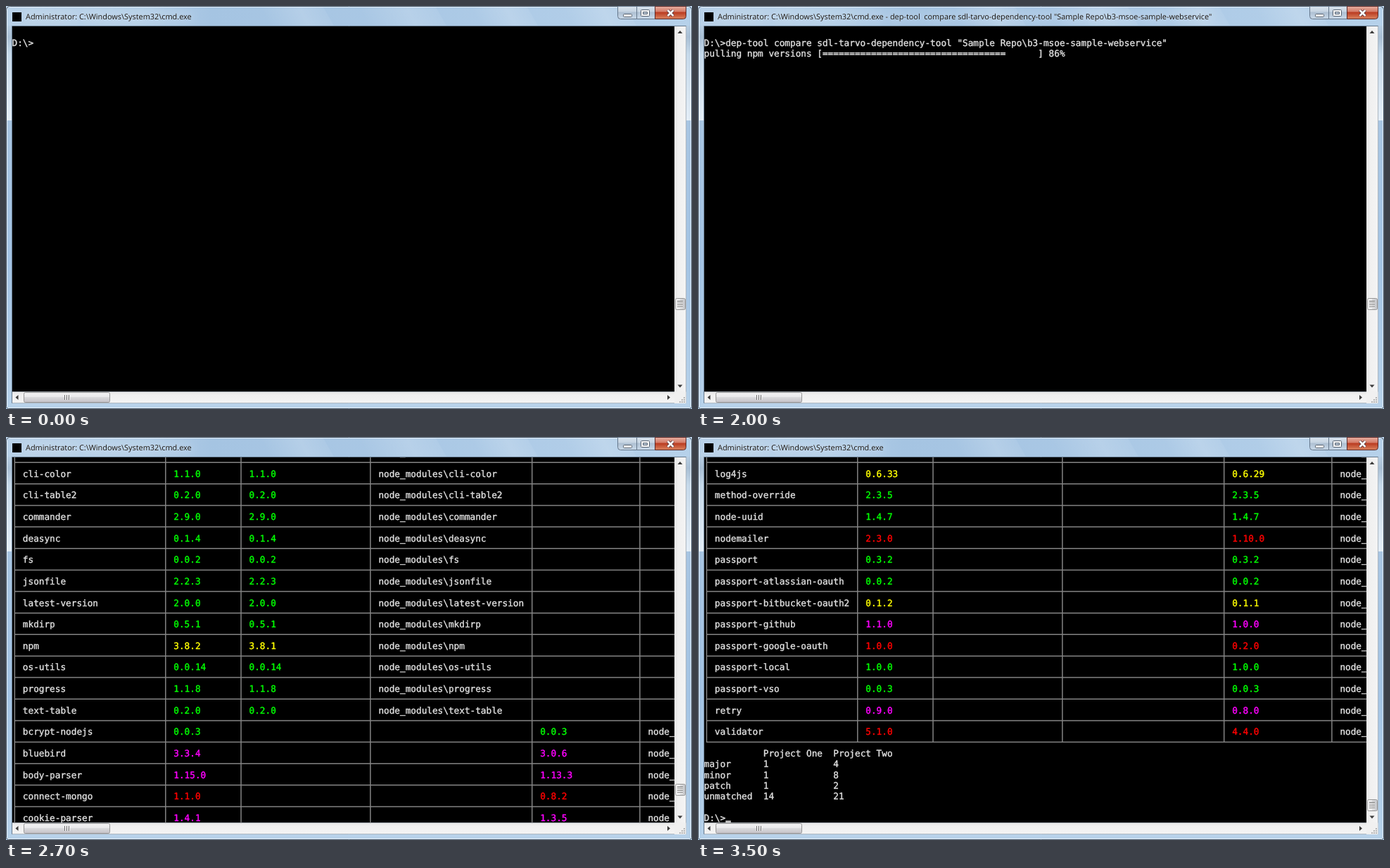
An HTML page with a canvas that plays this animation: 975 by 574 pixels, repeating every 6500 ms.

```html
<!DOCTYPE html>
<html lang="en">
<head>
<meta charset="utf-8">
<title>Console</title>
<style>
html, body { margin: 0; width: 100%; height: 100%; overflow: hidden; background: #b4cfe8; }
canvas { display: block; width: 975px; height: 574px; }
</style>
</head>
<body>
<canvas id="stage" width="975" height="574"></canvas>
<script>
const ctx = document.getElementById('stage').getContext('2d');
const W = 975, H = 574, LOOP = 6500;
const CELL = 7.66, LINE = 15.32, LEFT = 8.5, TOP = 29;
const MONO = '12.72px "DejaVu Sans Mono", monospace';
const SANS = '10.92px "Open Sans", sans-serif';
const TEXT = '#dedede';
const COLORS = { g: '#00ff00', m: '#ff00ff', r: '#ff0000', y: '#ffff00' };

const ARGS = 'compare sdl-tarvo-dependency-tool "Sample Repo\\b3-msoe-sample-webservice"';
const PROMPT = 'D:\\>';
const COMMAND = PROMPT + 'dep-tool ' + ARGS;
const TITLE = 'Administrator: C:\\Windows\\System32\\cmd.exe';

const RULES = [0, 28, 42, 66, 96, 116];
const HEADS = ['Module Name', 'NPM Version', 'dependency-comparator',
  'dependency-comparator Path', 'sample-webservice', 'sample-webservice Path'];
// module, colour, npm version, first project, second project
const MODULES = `jenkins m 0.15.0 0.13.0 0.10.1
async r 2.0.0-rc.1 1.5.2
chalk g 1.1.1 1.1.1
cli-color g 1.1.0 1.1.0
cli-table2 g 0.2.0 0.2.0
commander g 2.9.0 2.9.0
deasync g 0.1.4 0.1.4
fs g 0.0.2 0.0.2
jsonfile g 2.2.3 2.2.3
latest-version g 2.0.0 2.0.0
mkdirp g 0.5.1 0.5.1
npm y 3.8.2 3.8.1
os-utils g 0.0.14 0.0.14
progress g 1.1.8 1.1.8
text-table g 0.2.0 0.2.0
bcrypt-nodejs g 0.0.3 - 0.0.3
bluebird m 3.3.4 - 3.0.6
body-parser m 1.15.0 - 1.13.3
connect-mongo r 1.1.0 - 0.8.2
cookie-parser m 1.4.1 - 1.3.5
ejs m 2.4.1 - 2.3.4
express g 4.13.4 - 5.0.0-alpha.2
express-session m 1.13.0 - 1.11.3
log4js y 0.6.33 - 0.6.29
method-override g 2.3.5 - 2.3.5
node-uuid g 1.4.7 - 1.4.7
nodemailer r 2.3.0 - 1.10.0
passport g 0.3.2 - 0.3.2
passport-atlassian-oauth g 0.0.2 - 0.0.2
passport-bitbucket-oauth2 y 0.1.2 - 0.1.1
passport-github m 1.1.0 - 1.0.0
passport-google-oauth r 1.0.0 - 0.2.0
passport-local g 1.0.0 - 1.0.0
passport-vso g 0.0.3 - 0.0.3
retry m 0.9.0 - 0.8.0
validator r 5.1.0 - 4.4.0`.split('\n').map(row => row.split(' '));
const TABLE_TOP = 2, TABLE_END = TABLE_TOP + 2 + MODULES.length * 2;
const SUMMARY = [['', 'Project One', 'Project Two'], ['major', '1', '4'],
  ['minor', '1', '8'], ['patch', '1', '2'], ['unmatched', '14', '21']];

const cellX = col => LEFT + col * CELL;
const lineY = row => TOP + row * LINE;

function rect(x, y, w, h, fill) {
  ctx.fillStyle = fill;
  ctx.fillRect(x, y, w, h);
}

function gradient(x0, y0, x1, y1, ...stops) {
  const g = ctx.createLinearGradient(x0, y0, x1, y1);
  stops.forEach(([at, color]) => g.addColorStop(at, color));
  return g;
}

function poly(fill, ...pts) {
  ctx.fillStyle = fill;
  ctx.beginPath();
  pts.forEach(([x, y]) => ctx.lineTo(x, y));
  ctx.fill();
}

function box(x, y, w, h, radius, fill, stroke) {
  ctx.beginPath();
  ctx.roundRect(x + .5, y + .5, w - 1, h - 1, radius);
  ctx.fillStyle = fill;
  ctx.fill();
  ctx.strokeStyle = stroke;
  ctx.lineWidth = 1;
  ctx.stroke();
}

// The thin outline gives the letters the weight of a console font.
function print(row, col, text, color = TEXT) {
  const x = cellX(col), y = Math.round(lineY(row) + 12.4);
  ctx.fillStyle = ctx.strokeStyle = color;
  ctx.lineWidth = .4;
  ctx.fillText(text, x, y);
  ctx.strokeText(text, x, y);
}

function cursor(row, col) {
  rect(cellX(col), lineY(row) + 11.8, CELL, 3.6, '#c4c4c4');
}

function drawFrame() {
  rect(0, 0, W, H, gradient(0, 0, W, 0, [0, '#b9d1e8'], [.2, '#b4cfe8'], [.3, '#a5c4e2'], [.6, '#aac8e5'], [1, '#b6d1ea']));
  for (const [x, w] of [[360, 90], [500, 110], [660, 80], [790, 90]]) {
    const shine = gradient(x, 0, x + w, -w / 2, [0, 'rgba(255,255,255,0)'], [.5, 'rgba(255,255,255,.16)'], [1, 'rgba(255,255,255,0)']);
    poly(shine, [x, 0], [x + w, 0], [x + w + 16, 28], [x + 16, 28]);
  }
  for (const x of [0, 967]) {
    rect(x, 28, 8, 135, gradient(0, 28, 0, 163, [0, '#b7cde2'], [.12, '#a9bfd4'], [.3, '#c6d9ea'], [1, '#e4eef7']));
    rect(x, 163, 8, 411, gradient(0, 163, 0, 574, [0, '#a8c5e2'], [.5, '#a4c4e4'], [1, '#b7d2ea']));
  }
  rect(8, 566, 959, 8, '#b8d2ea');
  ctx.lineWidth = 1;
  ctx.strokeStyle = 'rgba(255,255,255,.7)';
  ctx.strokeRect(1.5, 1.5, W - 3, H - 3);
  ctx.strokeStyle = '#3b4d60';
  ctx.beginPath();
  ctx.roundRect(.5, .5, W - 1, H - 1, [5, 5, 3, 3]);
  ctx.stroke();
  ctx.strokeStyle = '#65798d';
  ctx.strokeRect(8.5, 28.5, 958, 537);
}

function drawButtons() {
  const glass = gradient(0, 0, 0, 18, [0, '#dbe5ef'], [.45, '#c6d4e2'], [.5, '#adbfd2'], [1, '#c8d8e8']);
  const red = gradient(0, 0, 0, 18, [0, '#e8b3a6'], [.45, '#d47a66'], [.5, '#b93a20'], [1, '#d9805c']);
  box(869, 0, 28, 19, [0, 0, 0, 4], glass, '#65778b');
  box(896, 0, 27, 19, 0, glass, '#65778b');
  box(922, 0, 45, 19, [0, 0, 4, 0], red, '#5c2c2c');
  box(877, 11, 13, 5, 1, '#fff', '#55606e');
  box(902, 5, 13, 10, 1, '#fff', '#55606e');
  box(905, 8, 7, 4, 0, '#b9c7d6', '#55606e');
  for (const [width, color] of [[4.4, '#5a3a40'], [2.5, '#fff']]) {
    ctx.strokeStyle = color;
    ctx.lineWidth = width;
    ctx.beginPath();
    ctx.moveTo(940.5, 6); ctx.lineTo(948.5, 14);
    ctx.moveTo(948.5, 6); ctx.lineTo(940.5, 14);
    ctx.stroke();
  }
}

function drawTitle(text) {
  rect(9, 9, 13, 13, '#000');
  ctx.font = SANS;
  ctx.shadowColor = '#fff';
  ctx.shadowBlur = 14;
  ctx.fillStyle = 'rgba(255,255,255,.9)';
  ctx.fillText(text, 28, 19);
  ctx.shadowBlur = 0;
  ctx.fillStyle = '#0a0a0a';
  ctx.fillText(text, 28, 19);
}

function drawScrollbars(thumbY) {
  rect(950, 29, 16.5, 537, gradient(950, 0, 967, 0, [0, '#e6e6e6'], [.3, '#f0f0f0'], [1, '#f4f4f4']));
  rect(9, 549.5, 941, 16, gradient(0, 549, 0, 566, [0, '#e6e6e6'], [.3, '#f0f0f0'], [1, '#f4f4f4']));
  rect(950, 549.5, 16.5, 16, '#f0f0f0');
  const ink = '#3c3c3c';
  poly(ink, [954.5, 39], [958, 35], [961.5, 39]);
  poly(ink, [954.5, 539.5], [958, 543.5], [961.5, 539.5]);
  poly(ink, [17.5, 554], [13.5, 557.5], [17.5, 561]);
  poly(ink, [940, 554], [944, 557.5], [940, 561]);

  box(951, thumbY, 15, 17, 2, gradient(951, 0, 966, 0, [0, '#f5f5f5'], [.45, '#e9e9eb'], [.5, '#d9dadc'], [1, '#c4c5c9']), '#979797');
  box(25, 550, 123, 15, 2, gradient(0, 550, 0, 565, [0, '#f5f5f5'], [.45, '#e9e9eb'], [.5, '#d9dadc'], [1, '#c4c0c6']), '#979797');
  for (let i = 0; i < 4; i++) {
    rect(954, thumbY + 4 + i * 2.6, 8, 1, '#6b6b6b');
    rect(954, thumbY + 5 + i * 2.6, 8, 1, '#fafafa');
  }
  for (let i = 0; i < 3; i++) {
    rect(83 + i * 3, 554, 1, 7, '#6b6b6b');
    rect(84 + i * 3, 554, 1, 7, '#fafafa');
  }
  for (let i = 0; i < 3; i++) {
    for (let j = 0; j <= i; j++) rect(963 - j * 3, 557 + i * 3, 2, 2, '#b4b4b4');
  }
}

function drawTable(scroll) {
  const mid = row => lineY(row - scroll) + 7.2;
  ctx.strokeStyle = '#848484';
  ctx.lineWidth = 1.5;
  ctx.beginPath();
  for (let row = TABLE_TOP; row <= TABLE_END; row += 2) {
    ctx.moveTo(cellX(.5) - .7, mid(row));
    ctx.lineTo(950, mid(row));
  }
  for (const col of RULES) {
    ctx.moveTo(cellX(col + .5), mid(TABLE_TOP));
    ctx.lineTo(cellX(col + .5), mid(TABLE_END));
  }
  ctx.stroke();

  const put = (row, i, text, color) => print(row - scroll, RULES[i] + 2, text, color);
  HEADS.forEach((head, i) => put(TABLE_TOP + 1, i, head));
  MODULES.forEach(([name, key, latest, one, two], i) => {
    const row = TABLE_TOP + 3 + i * 2, color = COLORS[key], path = 'node_modules\\' + name;
    put(row, 0, name);
    put(row, 1, latest, color);
    if (one !== '-') {
      put(row, 2, one, color);
      put(row, 3, path);
    }
    if (two) {
      put(row, 4, two, color);
      put(row, 5, path);
    }
  });
}

function drawReport(scroll) {
  print(1 - scroll, 0, COMMAND);
  drawTable(scroll);
  SUMMARY.forEach((cells, i) => {
    cells.forEach((text, j) => print(TABLE_END + 1 + i - scroll, [0, 11, 24][j], text));
  });
  const last = TABLE_END + SUMMARY.length + 2 - scroll;
  print(last, 0, PROMPT);
  cursor(last, PROMPT.length);
}

function drawProgress(percent) {
  const bar = '='.repeat(Math.floor(percent * .4)).padEnd(40);
  print(1, 0, COMMAND);
  print(2, 0, `pulling npm versions [${bar}] ${percent}%`);
}

function draw(t) {
  const running = t >= 1500 && t < 2500;
  const scroll = t < 2500 ? 0 : Math.min(50, Math.floor((t - 2500) / 200) * 10);
  let thumbY = 416;
  if (t >= 2500) thumbY = Math.round(489 + scroll * .54);
  else if (running && t < 2000) thumbY = 515;

  ctx.textRendering = 'geometricPrecision';
  ctx.lineJoin = 'round';
  drawFrame();
  drawTitle(running ? `${TITLE} - dep-tool  ${ARGS}` : TITLE);
  drawButtons();
  rect(9, 29, 941, 520.5, '#000');
  drawScrollbars(thumbY);

  ctx.save();
  ctx.beginPath();
  ctx.rect(8, 29, 942, 520.5);
  ctx.clip();
  ctx.font = MONO;
  if (t < 500) {
    print(1, 0, PROMPT);
  } else if (t < 1500) {
    print(1, 0, COMMAND);
    cursor(1, COMMAND.length);
  } else if (running) {
    drawProgress(t < 2000 ? 11 : 86);
  } else {
    drawReport(scroll);
  }
  ctx.restore();
}

const start = performance.now();
function tick() {
  draw((performance.now() - start) % LOOP);
  requestAnimationFrame(tick);
}
tick();
</script>
</body>
</html>
```
